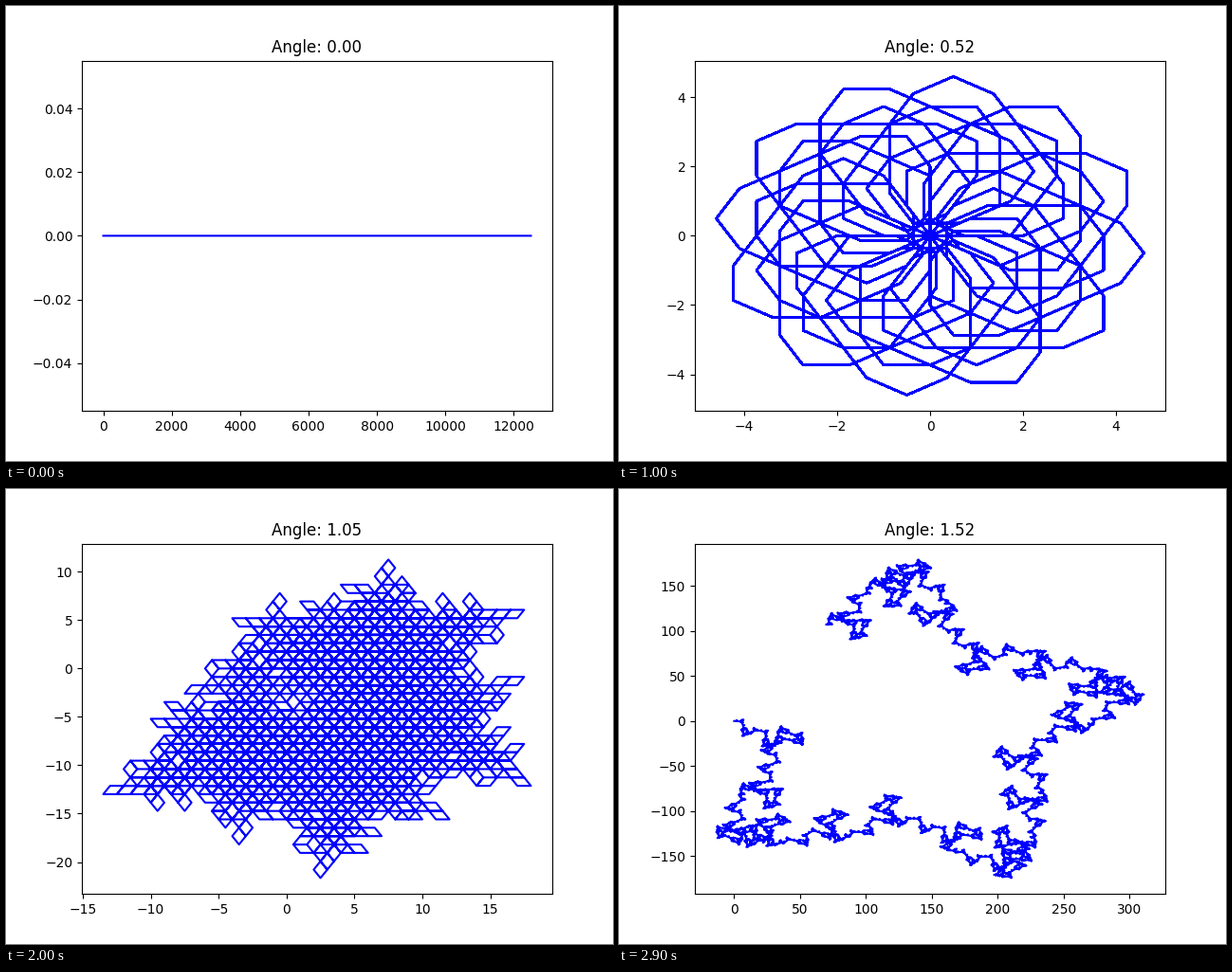
A matplotlib script that plays this animation: 640x480 px, repeating every 3000 ms.

```python
import numpy as np
import matplotlib.pyplot as plt
from matplotlib.animation import FuncAnimation

AXIOM = "F+F+F+F"
RULE = "FF+F++F+F"
DEPTH = 5
FRAMES = 30


def expand(word, depth):
    for _ in range(depth):
        word = word.replace("F", RULE)
    return word


def turn_counts(word):
    """Number of left turns made before each forward step."""
    symbols = np.array(list(word))
    return np.cumsum(symbols == "+")[symbols == "F"]


TURNS = turn_counts(expand(AXIOM, DEPTH))


def curve(angle):
    heading = TURNS * angle
    x = np.concatenate(([0], np.cumsum(np.cos(heading))))
    y = np.concatenate(([0], np.cumsum(np.sin(heading))))
    return x, y


fig, ax = plt.subplots(figsize=(6.4, 4.8), dpi=100)


def draw(frame):
    angle = frame * np.pi / 2 / FRAMES
    ax.clear()
    ax.plot(*curve(angle), color="blue", linewidth=1.5)
    ax.set_title(f"Angle: {angle:.2f}")


anim = FuncAnimation(fig, draw, frames=FRAMES, interval=100,
                     init_func=lambda: None, repeat=True, repeat_delay=0)
plt.show()
```
